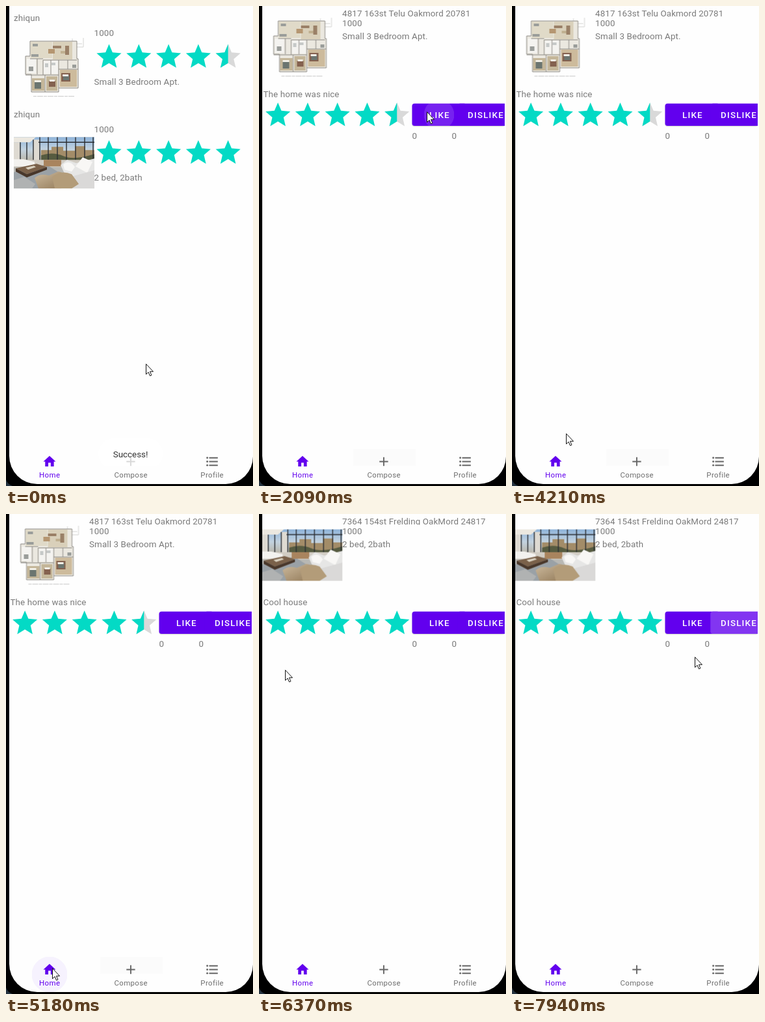
Write an HTML page that moves like this. It is 380x737 px and loops after 8000 ms.

```html
<!DOCTYPE html>
<html lang="en">
<head>
<meta charset="utf-8">
<title>Apartment reviews</title>
<style>
html, body { margin: 0; width: 100%; height: 100%; overflow: hidden; background: #000; }
svg { display: block; width: 100%; height: 100%; }
text { font: 13.36px Roboto, sans-serif; letter-spacing: .12px; fill: #7a7a7a; }
.btn text { font-weight: 500; letter-spacing: 1.19px; fill: #fff; }
.btn rect { fill: #6200ee; }
.nav text { font-size: 11.45px; letter-spacing: .38px; text-anchor: middle; fill: #6c6c6c; }
.nav { fill: #666; }
.nav .on { fill: #6200ee; }
.star { fill: #03dac5; }
.grey { fill: #d9d9d9; }

/* 1% = 80 ms */
.list, .detail, .first, .second, .pic1, .pic2, .ghost, .pill { animation: 8s step-end infinite; }
.list { animation-name: list; }
.detail { animation-name: detail; }
.first { animation-name: first; }
.second { animation-name: second; }
.pic1 { animation-name: pic1; }
.pic2 { animation-name: pic2; }
.ghost { animation-name: ghost; }
.pill { animation-name: pill; }
@keyframes list { 0% { opacity: 1 } 8.75% { opacity: 0 } 66.25% { opacity: 1 } 77.875%, 100% { opacity: 0 } }
@keyframes detail { 0% { opacity: 0 } 8.75% { opacity: 1 } 66.25% { opacity: 0 } 77.875%, 100% { opacity: 1 } }
@keyframes first { 0% { opacity: 0 } 8.75% { opacity: 1 } 66.25%, 100% { opacity: 0 } }
@keyframes second { 0% { opacity: 0 } 77.875%, 100% { opacity: 1 } }
@keyframes pic1 { 0% { opacity: 0 } 9.875%, 100% { opacity: 1 } }
@keyframes pic2 { 0% { opacity: 0 } 78.75%, 100% { opacity: 1 } }
@keyframes ghost { 0% { opacity: 0 } 22.5% { opacity: 1 } 66.25%, 100% { opacity: 0 } }
@keyframes pill { 0% { fill: #fff; fill-opacity: .75 } 14.125%, 100% { fill: #eee; fill-opacity: .94 } }

.toast { animation: toast 8s linear infinite; }
@keyframes toast { 0%, 18.75% { opacity: 1 } 22.5%, 100% { opacity: 0 } }

.rip { transform-box: fill-box; transform-origin: center; animation: 8s linear infinite; }
.like { fill: #fff; animation-name: like; }
.dislike { fill: #fff; animation-name: dislike; }
.home { fill: #6200ee; animation-name: home; }
@keyframes like {
  0%, 25.3% { opacity: 0; transform: scale(.1) }
  25.375% { opacity: .1; transform: scale(.2) }
  27.5%, 28.5% { opacity: .2; transform: scale(1) }
  31.25% { opacity: 0; transform: scale(1) }
  31.3%, 89.9% { opacity: 0; transform: scale(.1) }
  90% { opacity: .1; transform: scale(.2) }
  92% { opacity: .2; transform: scale(1) }
  94.5%, 100% { opacity: 0; transform: scale(1) }
}
@keyframes dislike {
  0%, 33.9% { opacity: 0; transform: scale(.1) }
  34% { opacity: .1; transform: scale(.2) }
  36%, 37.25% { opacity: .18; transform: scale(1) }
  39.75% { opacity: 0; transform: scale(1) }
  39.8%, 96.7% { opacity: 0; transform: scale(.1) }
  96.75% { opacity: .1; transform: scale(.2) }
  98.5%, 100% { opacity: .21; transform: scale(1) }
}
@keyframes home {
  0%, 64.7% { opacity: 0; transform: scale(.2) }
  64.75% { opacity: .05; transform: scale(.4) }
  67.5%, 69% { opacity: .085; transform: scale(1) }
  72.5%, 100% { opacity: 0; transform: scale(1) }
}

.cursor { animation: cursor 8s linear infinite; }
@keyframes cursor {
  0%, .5% { transform: translate(215px, 549px); animation-timing-function: ease-in-out }
  6%, 14.11% { transform: translate(66px, 94px) }
  14.125%, 14.5% { transform: translate(71px, 94px); animation-timing-function: ease-in-out }
  23.1%, 28.1% { transform: translate(258px, 162px); animation-timing-function: ease-in-out }
  31.75%, 37% { transform: translate(337px, 164px); animation-timing-function: ease-in-out }
  39.75%, 41.6% { transform: translate(233px, 194px) }
  42.75%, 46.75% { transform: translate(245px, 194px) }
  48.1% { transform: translate(262px, 188px); animation-timing-function: ease-in-out }
  52.5%, 52.8% { transform: translate(83px, 656px); animation-timing-function: ease-out }
  57.1%, 57.6% { transform: translate(94px, 697px); animation-timing-function: ease-in-out }
  60.9%, 68.5% { transform: translate(71px, 697px); animation-timing-function: ease-in-out }
  74.75%, 75.47% { transform: translate(40px, 254px) }
  75.5%, 81.6% { transform: translate(40px, 239px); animation-timing-function: ease-in-out }
  84.5%, 86.5% { transform: translate(250px, 182px) }
  87.1%, 89.2% { transform: translate(257px, 176px) }
  90%, 92.5% { transform: translate(264px, 170px); animation-timing-function: ease-in-out }
  94.5%, 97.2% { transform: translate(329px, 166px); animation-timing-function: ease-in-out }
  99.2%, 100% { transform: translate(281px, 219px) }
}
</style>
</head>
<body>
<svg viewBox="0 0 380 737" preserveAspectRatio="none">
<defs>
  <clipPath id="screen"><path d="M5 0H380V692A42 42 0 0 1 338 734H48A43 43 0 0 1 5 691Z"/></clipPath>
  <clipPath id="bar"><path d="M5 680H380V734H5Z"/></clipPath>
  <clipPath id="page"><path d="M5 0H378V680H5Z"/></clipPath>
  <clipPath id="line"><path d="M120 0H378V16.5H120Z"/></clipPath>
  <clipPath id="cut"><path d="M130 650H260V707H130Z"/></clipPath>
  <clipPath id="left"><path d="M0 0H12V24H0Z"/></clipPath>
  <clipPath id="frame"><path d="M0 0H124V79H0Z"/></clipPath>
  <clipPath id="likeBox"><rect x="235.5" y="149.7" width="84" height="34.3" rx="3.8"/></clipPath>
  <clipPath id="disBox"><rect x="305.3" y="149.7" width="90" height="34.3" rx="3.8"/></clipPath>
  <linearGradient id="sky" x2="0" y2="1"><stop stop-color="#8fb4da"/><stop offset=".5" stop-color="#c3d3e0"/><stop offset="1" stop-color="#b9b3a4"/></linearGradient>
  <linearGradient id="fur" x2="1" y2="1"><stop stop-color="#cdbb9f"/><stop offset="1" stop-color="#8f7654"/></linearGradient>

  <path id="star" d="M12 17.27 18.18 21l-1.64-7.03L22 9.24l-7.19-.61L12 2 9.19 8.63 2 9.24l5.46 4.73L5.82 21z"/>
  <g id="four" class="star">
    <use href="#star"/><use href="#star" x="24"/><use href="#star" x="48"/><use href="#star" x="72"/>
  </g>
  <g id="rate5"><use href="#four"/><use href="#star" x="96" class="star"/></g>
  <g id="rate45">
    <use href="#four"/>
    <g transform="translate(96)"><use href="#star" class="grey"/><use href="#star" class="star" clip-path="url(#left)"/></g>
  </g>

  <!-- floor plan, 90 x 90 -->
  <g id="plan">
    <path d="M73 1V14H90V0M73 9H88" fill="none" stroke="#d4d4d2"/>
    <path d="M8 5H80V32H82V77H52V83H10V56H1V28H8Z" fill="#ebe8e0"/>
    <path d="M9 6H42V31H9Z" fill="#e0dac8"/>
    <path d="M43 6H73V33H43Z" fill="#d9d0ba"/>
    <path d="M54 49H80V75H54Z" fill="#cdbb9c"/>
    <path d="M11 62H30V81H11ZM33 59H50V81H33Z" fill="#c4b699"/>
    <path d="M3 32H17V54H3ZM29 35H51V55H29Z" fill="#f4f3f0"/>
    <path d="M36 17H46V24H36Z" fill="#b59671"/>
    <path d="M43 12H56V16H43ZM62 12H68V26H62Z" fill="#9a8067"/>
    <path d="M55 20H62V24H55Z" fill="#c0b091"/>
    <path d="M56 54H70V67H56ZM37 66H47V75H37Z" fill="#84614f"/>
    <path d="M59 57H68V65H59ZM15 66H25V78H15Z" fill="#6b7570"/>
    <path d="M58 56H67V59H58ZM38 64H46V67H38ZM15 65H25V68H15Z" fill="#f3f0e8"/>
    <path d="M12 9H20V13H12ZM10 25H21V29H10ZM6 44H13V51H6ZM73 41H79V46H73Z" fill="#9a9d9a"/>
    <path d="M31 39H36V45H31ZM41 38H47V42H41Z" fill="#c6c9c8"/>
    <path d="M8 5H80V32H82V77H52V83H10V56H1V28H8ZM8 32H28M28 34H80M28 34V57M40 34V56M52 34V77M1 57H52M31 57V83M19 32V56M52 48H82M66 34V48" fill="none" stroke="#8d8a84"/>
    <path d="M13 89.7H76" stroke="#c8c8c8" stroke-dasharray="5 1 9 1"/>
  </g>

  <!-- living room, 124 x 79 -->
  <g id="room" clip-path="url(#frame)">
    <path d="M0 0H124V79H0Z" fill="#b8b8b4"/>
    <path d="M0 0H124V38H0Z" fill="url(#sky)"/>
    <path d="M42 20H58V15H76V21H94V14H110V20H124V38H42Z" fill="#a38c68"/>
    <path d="M42 28Q60 22 76 29T124 26V38H42Z" fill="#565b40"/>
    <path d="M0 0H34L25 8H0Z" fill="#ece8e0"/>
    <path d="M0 8H9V36H0ZM30 4H39V36H30Z" fill="#dedad2"/>
    <path d="M10 8V36M20 8V36M30 4V38M40 0V38M53 0V36M67 0V36M81 0V36M95 0V37M109 0V37M122 0V37M38 8H124" fill="none" stroke="#2b2e33" stroke-width="1.4"/>
    <path d="M0 35H124V46H0Z" fill="#d2cdc4"/>
    <path d="M0 54 50 42 75 58 50 79H0Z" fill="#9aa1a6"/>
    <path d="M0 34H15L32 38V45H0Z" fill="#f3f2ef"/>
    <path d="M46 35H73V45H46Z" fill="#a9845e"/>
    <path d="M3 48 35 41 51 46 20 57Z" fill="#7a614a"/>
    <path d="M3 48 20 57V62L3 53ZM20 57 51 46V50L20 62Z" fill="#49372a"/>
    <path d="M18 47 31 44 34 46 22 50Z" fill="#d9d1c0"/>
    <path d="M72 43 82 35 96 40 124 33V79H40L35 69 57 59 78 56Z" fill="#e6e6e5"/>
    <path d="M76 42Q86 34 94 46L89 53 78 50ZM95 45 106 31 121 38 113 55Z" fill="#f8f7f5"/>
    <path d="M84 62 124 51V79H80Z" fill="#dad9d8"/>
    <path d="M32 63Q40 55 54 59L68 53Q82 54 85 69L73 79H38Z" fill="url(#fur)"/>
    <path d="M59 61Q73 50 89 57L100 72 89 79H63Z" fill="#b39c79"/>
    <path d="M0 66 16 61 33 72 28 79H0Z" fill="#b0b2b2"/>
  </g>
</defs>

<path d="M0 727Q2 734 10 737H0Z" fill="#24323f"/>
<g clip-path="url(#screen)">
  <path d="M0 0H380V737H0Z" fill="#fefefe"/>

  <g class="list">
    <text x="12" y="23">zhiqun</text>
    <use href="#plan" x="29" y="49"/>
    <text x="135.5" y="46">1000</text>
    <use href="#rate45" transform="translate(135.6 54.8) scale(1.908)"/>
    <text x="135.5" y="121">Small 3 Bedroom Apt.</text>
    <text x="12" y="170.5">zhiqun</text>
    <use href="#room" x="12" y="201.3"/>
    <text x="135.5" y="193.5">1000</text>
    <use href="#rate5" transform="translate(135.6 202.1) scale(1.908)"/>
    <text x="135.5" y="268">2 bed, 2bath</text>
  </g>

  <g class="detail" clip-path="url(#page)">
    <g class="first">
      <use class="pic1" href="#plan" x="21.5" y="18"/>
      <text x="128" y="15.8" clip-path="url(#line)">4817 163st Telu Oakmord 20781</text>
      <text x="128" y="51">Small 3 Bedroom Apt.</text>
      <text x="6.5" y="140">The home was nice</text>
      <use href="#rate45" transform="translate(6.2 144.4) scale(1.908)"/>
    </g>
    <g class="second">
      <use class="pic2" href="#room" x="4.3" y="23.6"/>
      <text x="128" y="15.8" clip-path="url(#line)">7364 154st Frelding OakMord 24817</text>
      <text x="128" y="51">2 bed, 2bath</text>
      <text x="6.5" y="140">Cool house</text>
      <use href="#rate5" transform="translate(6.2 144.4) scale(1.908)"/>
    </g>
    <text x="128" y="31">1000</text>
    <g class="btn">
      <rect x="235.5" y="150.9" width="143" height="34.3" rx="3.8" style="fill:#000;opacity:.14"/>
      <rect x="235.5" y="149.7" width="84" height="34.3" rx="3.8"/>
      <g clip-path="url(#likeBox)"><circle class="rip like" cx="277" cy="167" r="48"/></g>
      <text x="262" y="172">LIKE</text>
      <rect x="305.3" y="149.7" width="90" height="34.3" rx="3.8"/>
      <g clip-path="url(#disBox)"><circle class="rip dislike" cx="344" cy="167" r="48"/></g>
      <text x="321" y="172">DISLIKE</text>
    </g>
    <text x="235.5" y="204">0</text>
    <text x="296.5" y="204">0</text>
  </g>

  <path class="ghost" d="M145 680H241V706H145Z" fill="#fbfbfb"/>
  <g clip-path="url(#bar)"><circle class="rip home" cx="67" cy="707" r="68"/></g>
  <g class="nav">
    <path class="on" transform="translate(55.5 688) scale(.954)" d="M10 20v-6h4v6h5v-8h3L12 3 2 12h3v8z"/>
    <path transform="translate(180.5 688) scale(.954)" d="M19 13h-6v6h-2v-6H5v-2h6V5h2v6h6z"/>
    <g transform="translate(305.8 688) scale(.954)">
      <circle cx="4" cy="6" r="1.5"/><circle cx="4" cy="12" r="1.5"/><circle cx="4" cy="18" r="1.5"/>
      <path d="M7 5h14v2H7zM7 11h14v2H7zM7 17h14v2H7z"/>
    </g>
    <text class="on" x="67.2" y="724">Home</text>
    <text x="192.2" y="724">Compose</text>
    <text x="317.2" y="724">Profile</text>
  </g>

  <g class="toast" clip-path="url(#cut)">
    <rect class="pill" x="142" y="664" width="99.5" height="47" rx="23.5"/>
    <text x="164.8" y="692.5" style="fill:#333;letter-spacing:0">Success!</text>
  </g>
</g>

<path class="cursor" d="M.5 .7V16.5L4.1 13.2 6.5 18.9 8.9 17.9 6.5 12.3H11.5Z" fill="#fff" stroke="#111" stroke-width="1"/>
</svg>
</body>
</html>
```
